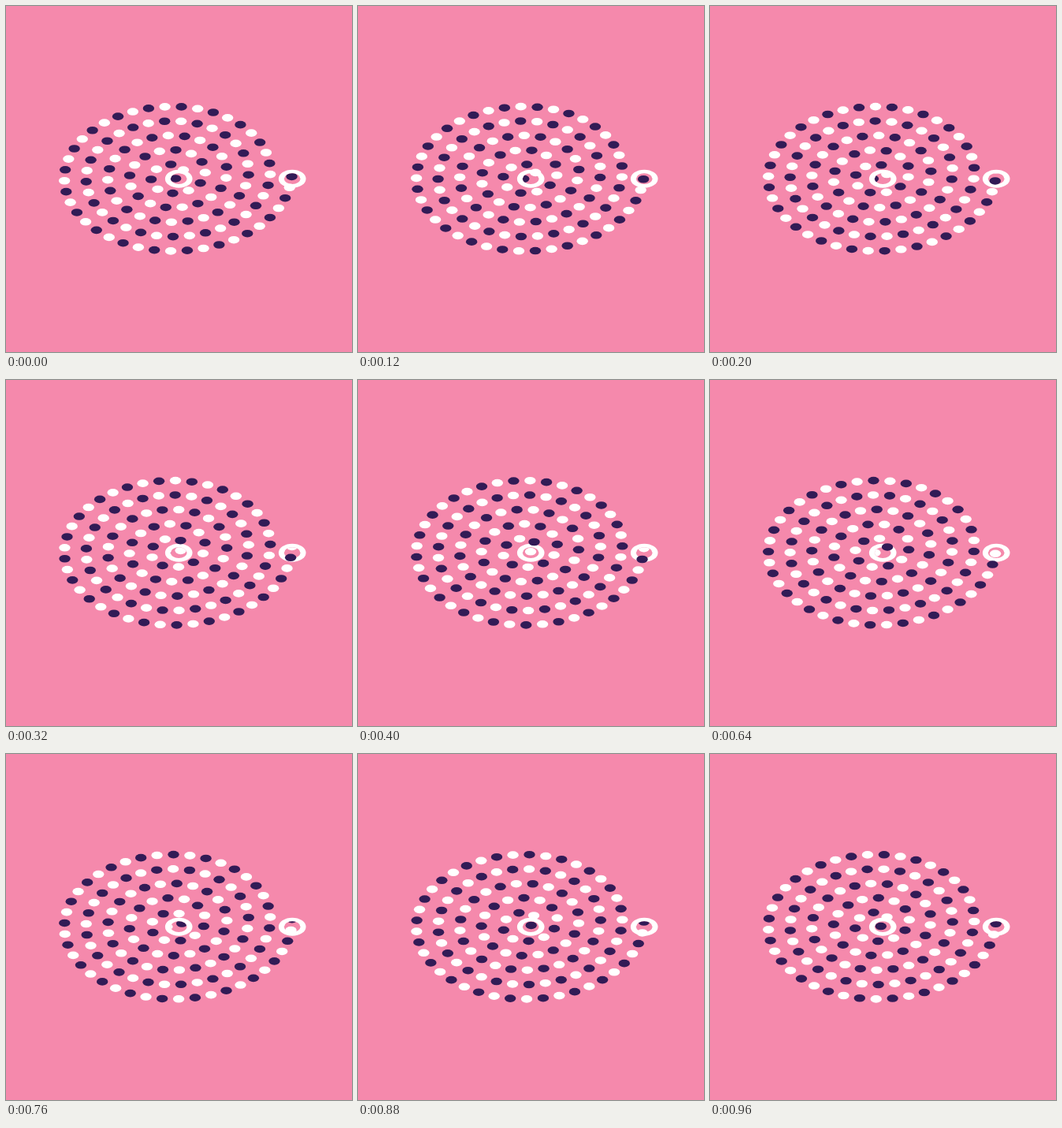
An HTML page with a canvas for the animation above (1 s loop, 439x439 px).

```html
<!DOCTYPE html>
<html lang="en">
<head>
<meta charset="utf-8">
<title>Spiral</title>
<style>
  html, body { margin: 0; width: 100%; height: 100%; overflow: hidden; background: #f589ac; }
  canvas { display: block; width: 439px; height: 439px; }
</style>
</head>
<body>
<canvas id="stage"></canvas>
<script>
const SIZE = 439, LOOP = 1000, STEP = 40;
const PINK = '#f589ac', WHITE = '#ffffff', DARK = '#321b56';
const TILT = 2 / 3;                         // vertical squash of the plane
const CX = 211.6, CY = 219.25;              // inner end of the spiral
const UNIT = 13.75, ARCS = 11;              // half circles grow by UNIT each
const GAP = 20.97, FIRST = 3.66, COUNT = 128;
const DOT = 7.2, RIM = 17.3, HOLE = 10.3;
const SINK_END = 15, SPRING_START = 2598;   // dots beyond these sit inside a hole
const sink = { x: 219.2, y: 219.2 }, spring = { x: 363.2, y: 219.2 };

const canvas = document.getElementById('stage');
const ctx = canvas.getContext('2d');
const dpr = window.devicePixelRatio || 1;
canvas.width = canvas.height = Math.round(SIZE * dpr);
ctx.scale(dpr, dpr);

function oval(x, y, r) {
  ctx.beginPath();
  ctx.ellipse(x, y, r, r * TILT, 0, 0, 2 * Math.PI);
}

function fillOval(x, y, r, color) {
  oval(x, y, r);
  ctx.fillStyle = color;
  ctx.fill();
}

function ring(p) {
  fillOval(p.x, p.y, RIM, WHITE);
  fillOval(p.x, p.y, HOLE, PINK);
}

// Point at length s from the inner end: odd arcs bulge right, even arcs left
function pointAt(s) {
  if (s < 0) return { x: CX + s, y: CY };
  let k = 1;
  while (k < ARCS && s > Math.PI * UNIT * k) s -= Math.PI * UNIT * k++;
  const r = UNIT * k, a = s / r;
  const side = k % 2 ? 1 : -1;
  const cy = k % 2 ? CY - UNIT * TILT : CY;
  return { x: CX + side * r * Math.sin(a), y: cy + side * r * TILT * Math.cos(a) };
}

function drawDot(s, color) {
  const p = pointAt(s);
  const hole = s < SINK_END ? sink : s > SPRING_START ? spring : null;
  ctx.save();
  if (hole) {
    oval(hole.x, hole.y, HOLE);
    ctx.clip();
  }
  fillOval(p.x, p.y, DOT, color);
  ctx.restore();
}

function draw(t) {
  ctx.fillStyle = PINK;
  ctx.fillRect(0, 0, SIZE, SIZE);
  ring(sink);
  ring(spring);
  for (let i = 0; i < COUNT; i++) {
    drawDot(FIRST + GAP * (i - 2 * t), i % 2 ? WHITE : DARK);
  }
}

const start = performance.now();
function frame() {
  const ms = (performance.now() - start) % LOOP;
  draw(Math.floor(ms / STEP) * STEP / LOOP);
  requestAnimationFrame(frame);
}
frame();
</script>
</body>
</html>
```
